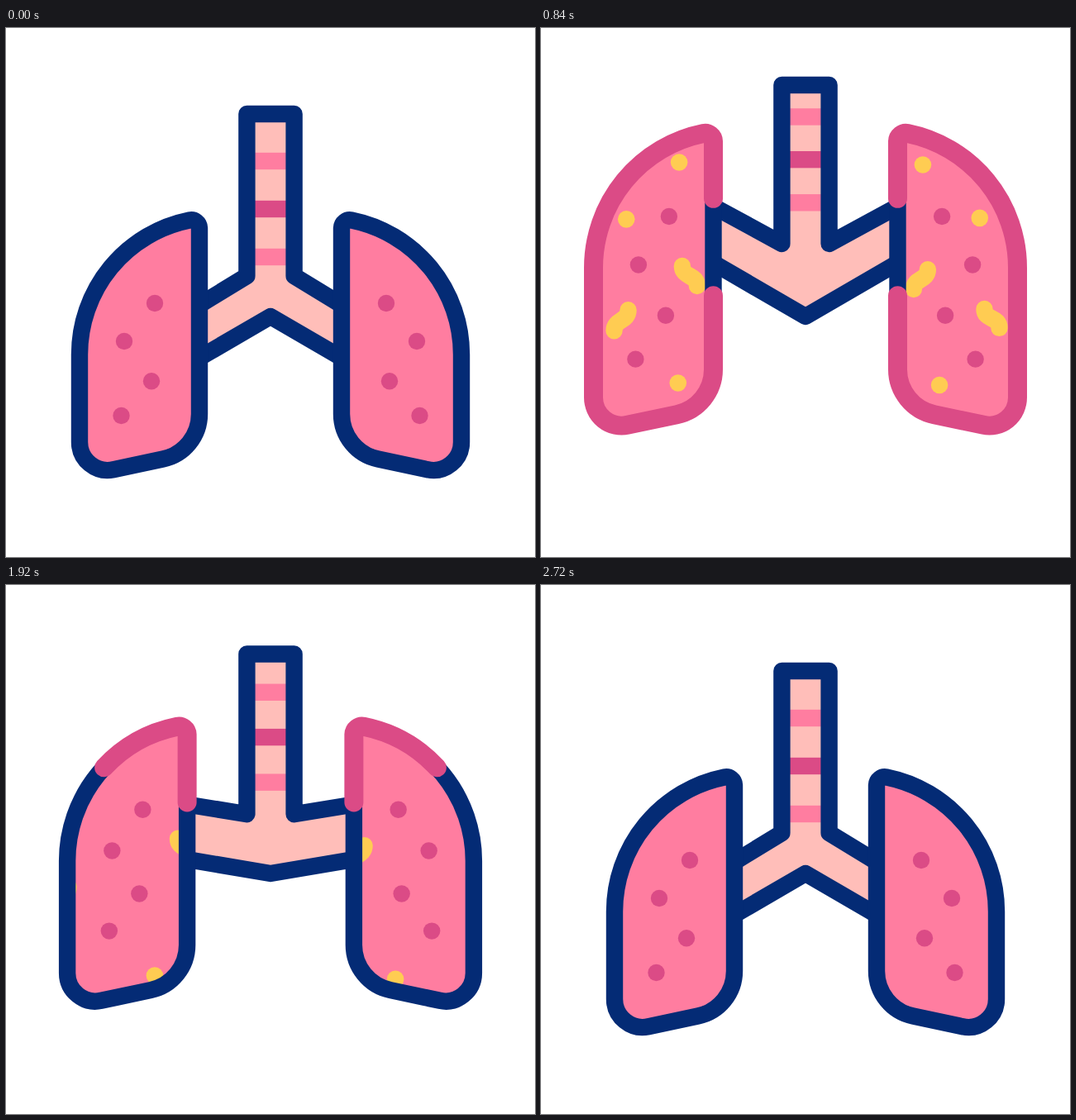
An HTML page that plays this animation: 640 by 640 pixels, repeating every 2.8 s.

```html
<!DOCTYPE html>
<html lang="en">
<head>
<meta charset="utf-8">
<title>Breathing lungs</title>
<style>
  html, body { margin: 0; width: 100%; height: 100%; overflow: hidden; background: #fff; }
  svg { display: block; width: 100vw; height: 100vh; }
  .line { fill: none; stroke: #042b75; stroke-width: 20.4; stroke-linejoin: round; stroke-linecap: round; }
  .ring { fill: none; stroke: #db4b86; stroke-width: 23; stroke-linejoin: round; stroke-linecap: round; }
  .bean { fill: none; stroke: #ffcc52; stroke-width: 20.4; stroke-linecap: round; }
  .tissue { fill: #ff7da0; }
  .spot { fill: #db4b86; }
  .germ { fill: #ffcc52; }
  .airway { fill: #ffbeb9; }
</style>
</head>
<body>
<svg id="stage" viewBox="0 0 640 640"></svg>
<script>
const LOOP = 2800;
const stage = document.getElementById('stage');

function add(parent, tag, attrs = {}) {
  const node = document.createElementNS('http://www.w3.org/2000/svg', tag);
  set(node, attrs);
  parent.appendChild(node);
  return node;
}

function set(node, attrs) {
  for (const key in attrs) node.setAttribute(key, attrs[key]);
}

// Cubic timing curve with control points (a, 0) and (b, 1).
function ease(t, from, to, a = 0.667, b = 0.167) {
  const x = (t - from) / (to - from);
  if (x <= 0) return 0;
  if (x >= 1) return 1;
  let low = 0, high = 1;
  for (let i = 0; i < 24; i++) {
    const s = (low + high) / 2, r = 1 - s;
    if (3 * a * s * r * r + 3 * b * s * s * r + s * s * s < x) low = s;
    else high = s;
  }
  return low * low * (3 - 2 * low);
}

// Airway
const airway = add(stage, 'path', { class: 'airway' });
const stripes = [
  { y: 161, lift: 54.6, kind: 'tissue' },
  { y: 219, lift: 61, kind: 'spot' },
  { y: 277, lift: 67, kind: 'tissue' }
].map(s => ({ ...s, node: add(stage, 'rect', { class: s.kind, x: 295, width: 50, height: 20.4 }) }));
const airwayLine = add(stage, 'path', { class: 'line' });

// Lungs: both are drawn as a left lung, the second one mirrored.
const spots = [[180, 333], [143, 379], [176, 427.3], [139.5, 469]];

// Each germ: start point, optional end point of a bean, drift direction.
const leftGerms = [
  { at: [169, 171], drift: [-2, -9] },
  { at: [107, 237], drift: [-4, -6] },
  { at: [162, 418], drift: [4, 12.2] },
  { at: [161, 283], to: [179, 307], drift: [10.5, 5.3] },
  { at: [113.5, 335], to: [96.5, 360], drift: [-8.5, 6.7] }
];
const rightGerms = [
  { at: [179, 174], drift: [-1, -9] },
  { at: [113, 235.5], drift: [-4, -6] },
  { at: [155, 420], drift: [3.1, 12.7] },
  { at: [163, 286], to: [180, 310], drift: [9.7, 6.5] },
  { at: [112, 334], to: [94, 357], drift: [-9, 6.3] }
];

function makeLung(id, germs, mirrored) {
  const group = add(stage, 'g', mirrored ? { transform: 'translate(640 0) scale(-1 1)' } : {});
  const clip = add(add(group, 'clipPath', { id }), 'path');
  const tissue = add(group, 'path', { class: 'tissue' });
  const dots = spots.map(() => add(group, 'circle', { class: 'spot', r: 10.2 }));
  const inside = add(group, 'g', { 'clip-path': `url(#${id})` });
  const moving = germs.map(({ at: [x, y], to, drift }) => ({
    drift,
    node: to
      ? add(inside, 'path', { class: 'bean', d: `M${x} ${y}C${x} ${y + 14} ${to[0]} ${to[1] - 14} ${to}` })
      : add(inside, 'circle', { class: 'germ', cx: x, cy: y, r: 10.3 })
  }));
  const line = add(group, 'path', { class: 'line' });
  const ring = add(group, 'path', { class: 'ring', pathLength: 1 });
  return { outlines: [clip, tissue, line, ring], dots, moving, ring };
}

const lungs = [makeLung('left', leftGerms, false), makeLung('right', rightGerms, true)];

// Starts at the foot of the inner edge and runs up, over the top and around.
function lungPath(p) {
  const at = (x, y) => `${x - 26 * p} ${y}`;
  const top = y => y - 107 * p;
  const low = y => y - 55 * p;
  return `M${at(234, low(467))}L${at(234, top(242))}` +
    `A10 10 0 0 0 ${at(222, top(232.5))}` +
    `A165.8 165.8 0 0 0 ${at(89, top(395))}` +
    `L${at(89, low(501))}` +
    `A34 34 0 0 0 ${at(130, low(534.3))}` +
    `L${at(189.8, low(521.6))}` +
    `A55.8 55.8 0 0 0 ${at(234, low(467))}Z`;
}

function drawAirway(p) {
  const side = 234 - 26 * p;
  const upper = 335 - 121.5 * p;
  const lower = 399 - 117 * p;
  const fork = 300 - 39.8 * p;
  const top = 104 - 35.7 * p;
  const tube = `M${side} ${upper}L291.4 ${fork}V${top}H348.6V${fork}L${640 - side} ${upper}`;
  set(airway, { d: `${tube}V${lower}L320 349L${side} ${lower}Z` });
  set(airwayLine, { d: `${tube}M${side} ${lower}L320 349L${640 - side} ${lower}` });
  for (const s of stripes) set(s.node, { y: s.y - 10.2 - s.lift * p });
}

function drawLung(lung, p, stretch, drift, start, length) {
  const d = lungPath(p);
  for (const node of lung.outlines) set(node, { d });
  lung.dots.forEach((dot, i) => {
    const [x, y] = spots[i];
    set(dot, { cx: x - 25.6 * p, cy: y - 107 * p + 38 * stretch * (y - 333) / 136 });
  });
  for (const g of lung.moving) {
    set(g.node, { transform: `translate(${g.drift[0] * drift} ${g.drift[1] * drift})` });
  }
  set(lung.ring, {
    visibility: length < 0.004 ? 'hidden' : 'visible',
    'stroke-dasharray': length > 0.995 ? 'none' : `${length} ${1 - length}`,
    'stroke-dashoffset': -start
  });
}

function render(t) {
  const breath = ease(t, 68, 1011) - ease(t, 1386, 2660);
  const stretch = ease(t, 253, 1026) - ease(t, 1480, 2350);
  const away = 1 - ease(t, 245, 1200) + ease(t, 1386, 2660);
  const length = ease(t, 400, 1290, 0.25, 0.02) - ease(t, 1400, 2580, 0.19, 0.2);
  const start = t < 1400
    ? Math.min(0.451, 0.079 + 0.00049 * (t - 520))
    : 0.355 - 0.00046 * (t - 1600);
  drawAirway(breath);
  for (const lung of lungs) drawLung(lung, breath, stretch, 11.4 * away - 0.4, start, length);
}

const begin = performance.now();
function tick() {
  render((performance.now() - begin) % LOOP);
  requestAnimationFrame(tick);
}
tick();
</script>
</body>
</html>
```
